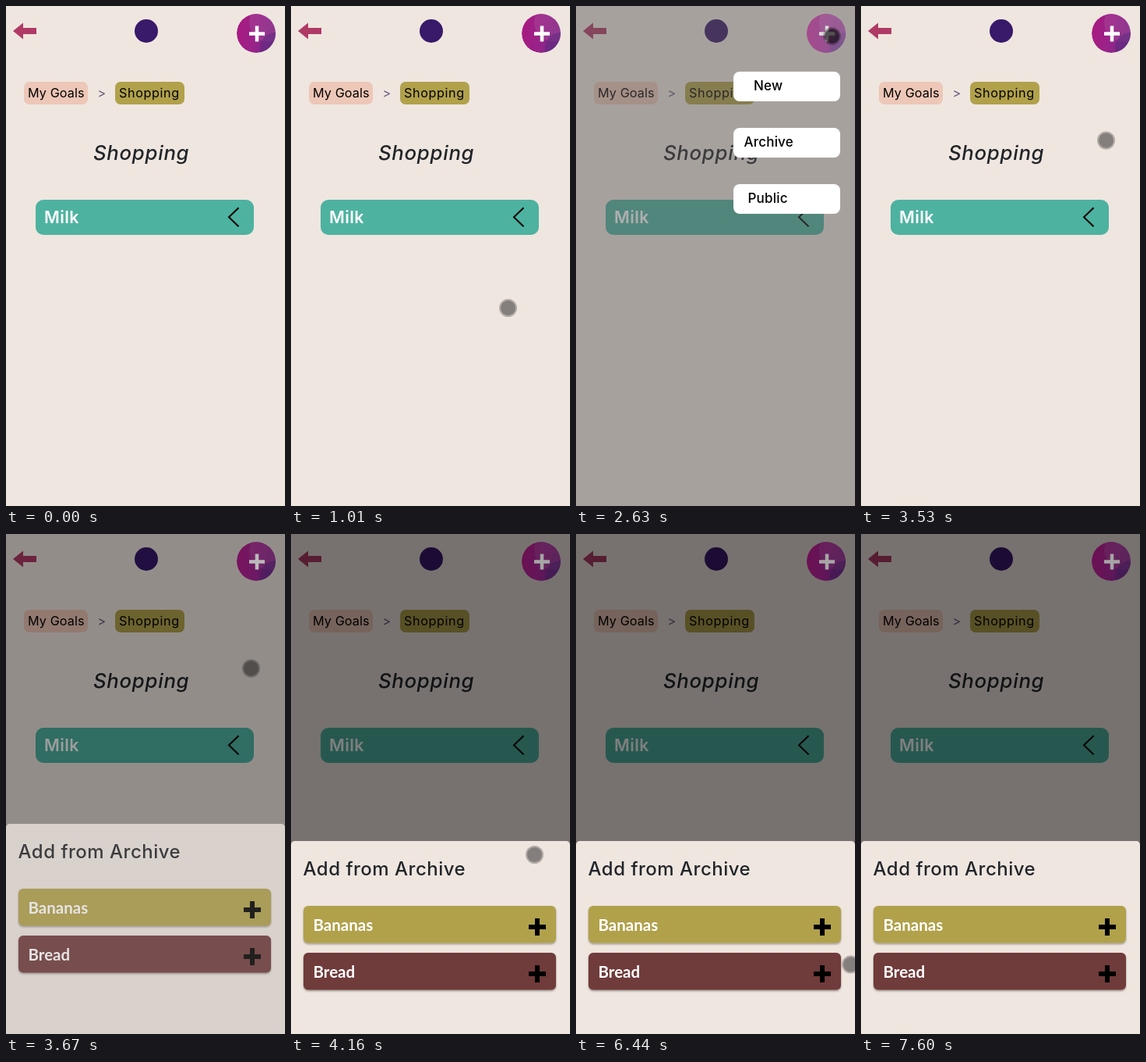
Recreate the animation shown at these times as an HTML page. Size 358 px wide and 640 px high, loop 8000 ms.

```html
<!DOCTYPE html>
<html lang="en">
<head>
<meta charset="utf-8">
<title>Shopping goals</title>
<style>
  html, body { margin: 0; width: 100%; height: 100%; overflow: hidden; background: #efe6e0; }
  svg { display: block; width: 100%; height: 100%; }
  text { font-family: Inter, "Open Sans", sans-serif; font-weight: 500; }
  .crumb { font-size: 16.2px; font-weight: 400; letter-spacing: .1px; }
  .crumb.wide { letter-spacing: .6px; }
  .title { font-size: 25.8px; font-style: italic; letter-spacing: .7px; fill: #212529; }
  .goal { font-size: 21.5px; font-weight: 600; letter-spacing: .4px; fill: #fff; }
  .heading { font-size: 24px; letter-spacing: .5px; fill: #212529; }
  .menu { font-size: 17px; letter-spacing: .2px; }
  .item { font: 700 20.5px Lato, "Open Sans", sans-serif; fill: #fff; }
</style>
</head>
<body>
<svg viewBox="0 0 358 640">
  <defs>
    <linearGradient id="tone" x1="0" y1=".4" x2="1" y2=".6">
      <stop offset="0" stop-color="#a81a80"/>
      <stop offset=".5" stop-color="#98238a"/>
      <stop offset="1" stop-color="#6f2c86"/>
    </linearGradient>
    <clipPath id="disc"><circle cx="321" cy="35" r="25"/></clipPath>
    <filter id="shade" x="-5%" y="-10%" width="110%" height="130%">
      <feDropShadow dx="0" dy="1.5" stdDeviation=".9" flood-opacity=".38"/>
    </filter>
  </defs>

  <rect width="358" height="640" fill="#efe6e0"/>
  <path d="M9 32 L22 21.500 V28 H39 V36 H22 V42.500 Z" fill="#b03a66"/>
  <circle cx="180" cy="32" r="15" fill="#38196a"/>

  <g id="add">
    <g clip-path="url(#disc)">
      <circle cx="321" cy="35" r="25" fill="url(#tone)"/>
      <circle cx="337" cy="21" r="25" fill="#a84798" opacity=".5"/>
      <circle cx="346" cy="54" r="20" fill="#5a2b80" opacity=".5"/>
    </g>
    <path d="M312 35.500 H332 M322 25.500 V45.500" stroke="#fff" stroke-width="4.500"/>
  </g>

  <rect x="23" y="97" width="82" height="29" rx="7" fill="#edc7b7"/>
  <text class="crumb" x="28" y="117">My Goals</text>
  <text class="crumb" x="117.500" y="117" fill="#66587a">&gt;</text>
  <rect x="140" y="97" width="89" height="29" rx="7" fill="#b1a14b"/>
  <text class="crumb wide" x="145" y="117">Shopping</text>
  <text class="title" x="112" y="197">Shopping</text>
  <rect x="38" y="248" width="280" height="45" rx="10" fill="#4eb2a0"/>
  <text class="goal" x="49" y="278">Milk</text>
  <path d="M298.500 258.300 L286 270.300 L298.500 282.300" fill="none" stroke="#000" stroke-width="2"/>

  <g id="menu">
    <rect id="veil" width="358" height="640" fill="#555453"/>
    <use href="#add" opacity=".5"/>
    <circle cx="321" cy="35" r="25" fill="#fff" opacity=".16"/>
  </g>

  <g id="backdrop">
    <rect width="358" height="640" opacity=".5"/>
    <use href="#add" opacity=".3"/>
  </g>
  <g id="sheet">
    <rect y="393" width="358" height="320" rx="4.800" fill="#efe6e0"/>
    <text class="heading" x="15.500" y="437">Add from Archive</text>
  </g>

  <g id="cursor">
    <circle r="11.500" fill-opacity=".26"/>
    <circle id="dot" r="9.500"/>
  </g>
</svg>
<script>
  const LOOP = 8000, STEP = 68;
  const el = id => document.getElementById(id);
  const [menu, veil, backdrop, sheet, cursor, dot] =
    ["menu", "veil", "backdrop", "sheet", "cursor", "dot"].map(el);

  const option = (label, x, y) => `
    <rect x="202" y="${y}" width="137" height="38" rx="8" fill="#fff"/>
    <text class="menu" x="${x}" y="${y + 24}">${label}</text>`;
  const row = (label, fill, y) => `
    <rect x="16" y="${y}" width="324" height="47.5" rx="6" fill="${fill}" filter="url(#shade)"/>
    <text class="item" x="28.5" y="${y + 31.5}">${label}</text>
    <path d="M305 ${y + 27} h22 m-11 -11 v22" stroke="#000" stroke-width="6"/>`;
  menu.innerHTML += option("New", 228, 84) + option("Archive", 215.5, 156) + option("Public", 220.5, 228);
  sheet.innerHTML += row("Bananas", "#b1a14b", 476) + row("Bread", "#703a3a", 536);
  const veilNow = el("veil");

  // Each pointer move eases out to its point; zero length means a jump.
  const move = (start, length, x, y, power = 3) => ({ start, length, x, y, power });
  const moves = [
    move(870, 0, 324.5, 588.5),
    move(870, 550, 218.5, 122.5, 2),
    move(1845, 445, 328.5, 38.5),
    move(2760, 440, 314.5, 172, 2),
    move(3880, 280, 312.5, 410.5, 1.3),
    move(4160, 670, 321, 504.5, 2),
    move(5030, 0, 329.5, 496.5),
    move(6440, 0, 352.5, 551),
    move(6440, 610, 325, 562, 2),
    move(7200, 330, 309.5, 421.5, 1)
  ];
  const bursts = [870, 1880, 2490, 3330, 4160, 5030, 6440, 7250];

  const ramp = (t, start, length) =>
    length ? Math.min(1, Math.max(0, (t - start) / length)) : +(t >= start);
  const easeOut = (p, power) => 1 - Math.pow(1 - p, power);
  const within = (t, a, b) => t >= a && t < b;
  const show = (node, on) => node.setAttribute("visibility", on ? "visible" : "hidden");

  // Movement advances in short, even steps within each burst.
  function snap(t) {
    const start = bursts.filter(b => b <= t).pop();
    return start === undefined ? t : start + Math.floor((t - start) / STEP) * STEP;
  }

  function pointAt(t) {
    let x = 0, y = 0;
    for (const m of moves) {
      const p = easeOut(ramp(t, m.start, m.length), m.power);
      x += (m.x - x) * p;
      y += (m.y - y) * p;
    }
    return [x, y];
  }

  function draw(time) {
    const t = snap(time);
    show(menu, within(t, 2490, 3460));
    veilNow.setAttribute("opacity", 0.47 * ramp(t, 2420, 200));

    const fade = ramp(t, 3555, 150);
    const slide = easeOut(ramp(t, 3555, 300), 1.7);
    backdrop.setAttribute("opacity", fade);
    sheet.setAttribute("opacity", fade);
    sheet.setAttribute("transform", `translate(0 ${-50 * (1 - slide)})`);

    const pressed = within(t, 2490, 2700) || within(t, 3330, 3460);
    show(cursor, within(t, 870, 5095) || within(t, 6440, 7585));
    cursor.setAttribute("transform", `translate(${pointAt(t)})`);
    dot.setAttribute("fill-opacity", pressed ? 0.5 : 0.25);
  }

  const begin = performance.now();
  function tick() {
    draw((performance.now() - begin) % LOOP);
    requestAnimationFrame(tick);
  }
  tick();
</script>
</body>
</html>
```
